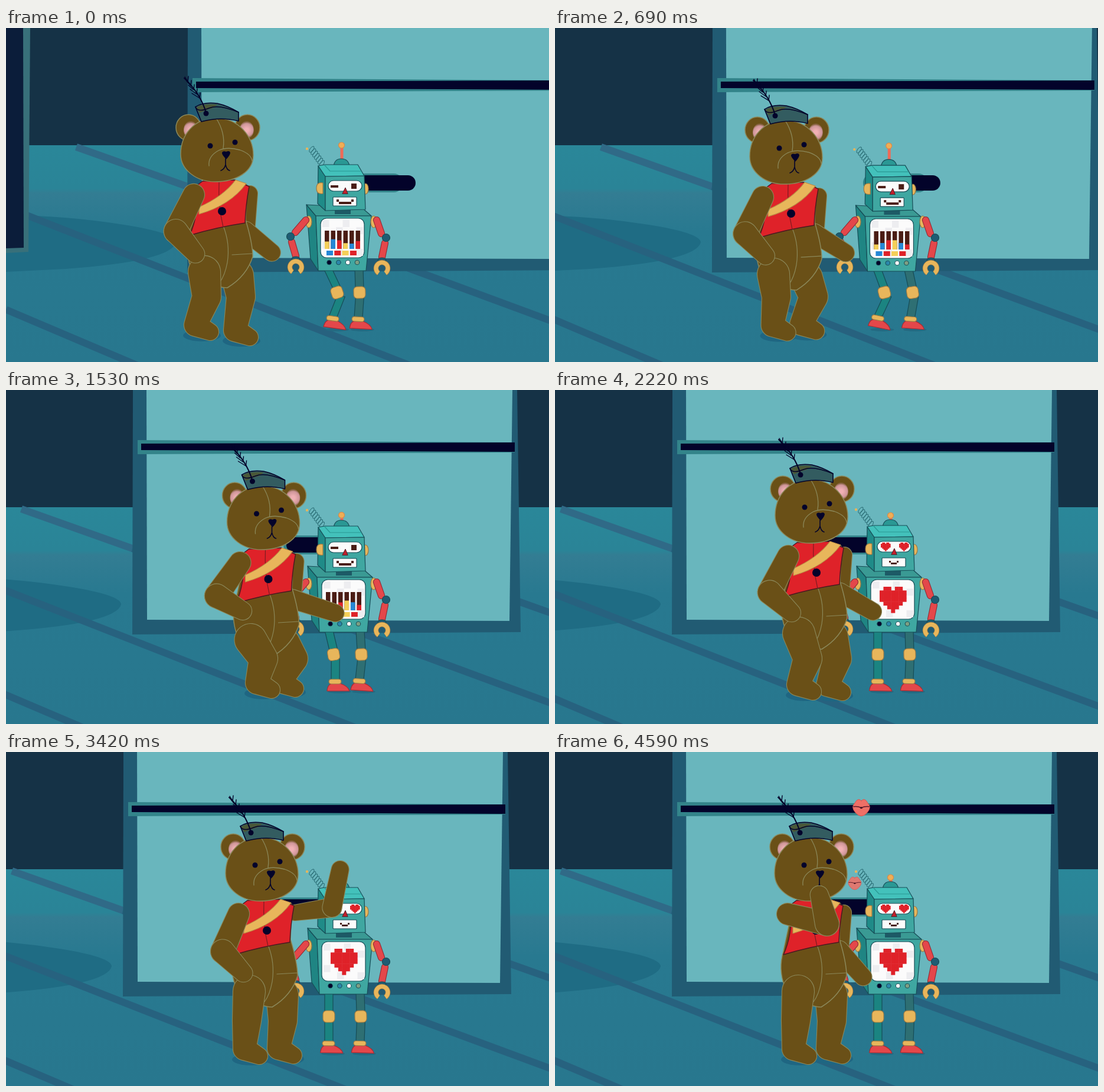
These frames come from a looping animation (920x567 px, 4620 ms). An HTML page with a canvas:

```html
<!DOCTYPE html>
<html lang="en">
<head>
<meta charset="utf-8">
<title>Bear and robot</title>
<style>
html, body { margin: 0; width: 100%; height: 100%; overflow: hidden; background: #153246; }
canvas { display: block; }
</style>
</head>
<body>
<canvas id="stage" width="920" height="567"></canvas>
<script>
const c = document.getElementById('stage').getContext('2d');
const LOOP = 4620, STEP = 30, HEARTS_AT = 1900;
const FUR = '#6a5017', SEAM = '#8b885a', INK = '#03032a', RED = '#df2229', CORAL = '#e4474a',
  TAN = '#e8b65b', LINE = '#174d57', STEEL = '#1e5c73', BRASS = '#9a7a45';
const rad = Math.PI / 180;

// --- timelines ---------------------------------------------------------
const pan = [[0, 0], [420, -24], [1020, -62], [1530, -93], [1780, -105], [2220, -109]];

// time, head x y, right arm (upper, lower, length), left arm (upper, lower),
// then per leg: knee x, ankle x y
const stand = [408, 405, 504, 469, 463, 503];
const bearKeys = [
  [0, 358, 206, 97, 39, 58, 116, 49, 340, 322, 504, 398, 389, 513],
  [420, 356, 206, 97, 41, 56, 111, 54, 325, 325, 511, 398, 380, 507],
  [1020, 436, 215, 97, 21, 71, 121, 39, 436, 424, 497, 487, 465, 497],
  [1530, 436.5, 216, 97, 18, 78, 125, 30, 436, 426, 497, 487, 466, 495],
  [2220, 435, 205, 97, 30, 65, 117, 43, 428, 413, 500, 478, 463, 501],
  [2700, 434, 198, 97, 30, 65, 113, 46, ...stand],
  [3180, 434, 198, -8, -78, 66, 113, 46, ...stand],
  [3480, 434, 198, -8, -78, 66, 113, 46, ...stand],
  [3930, 434, 198, 97, 48, 61, 14, -105, ...stand],
];

// time, head x y, torso x y, antenna, left knee and ankle x, right knee and ankle x
const robotKeys = [
  [0, 0, 2, -2, 1, 1, 561, 553, 599, 596],
  [420, -5, 4, -2, 2, 1, 553, 533, 609, 608],
  [1020, 0, 2, -1, 2, 1, 564, 563, 602, 594],
  [1530, 0, 1, 0, 0, .1, 555, 557, 602, 598],
  [2220, 0, 0, 0, 0, 0, 547, 546, 601, 599],
];

function sample(keys, t, smooth) {
  const i = keys.findIndex(k => k[0] > t);
  if (i < 0) return keys[keys.length - 1].slice(1);
  const a = keys[i - 1], b = keys[i];
  let u = (t - a[0]) / (b[0] - a[0]);
  if (smooth) u = u * u * (3 - 2 * u);
  return a.slice(1).map((v, j) => v + (b[j + 1] - v) * u);
}

// --- drawing helpers ---------------------------------------------------
function paint(p, fill, line, width = 1.2) {
  if (typeof p === 'string') p = new Path2D(p);
  if (fill) { c.fillStyle = fill; c.fill(p); }
  if (line) { c.strokeStyle = line; c.lineWidth = width; c.stroke(p); }
}
function oval(x, y, rx, ry, fill, line, width) {
  const p = new Path2D();
  p.ellipse(x, y, rx, ry, 0, 0, 7);
  paint(p, fill, line, width);
}
function box(x, y, w, h, r, fill, line) {
  const p = new Path2D();
  p.roundRect(x, y, w, h, r);
  paint(p, fill, line);
}
function rect(x, y, w, h, fill) {
  c.fillStyle = fill;
  c.fillRect(x, y, w, h);
}
function at(x, y, draw, turn = 0, scale = 1) {
  c.save();
  c.translate(x, y);
  c.rotate(turn);
  c.scale(scale, scale);
  draw();
  c.restore();
}
// outline around two circles joined by their tangents; joints are [x, y, radius]
function bone(path, [x1, y1, r1], [x2, y2, r2]) {
  const dir = Math.atan2(y2 - y1, x2 - x1);
  const open = Math.acos((r1 - r2) / Math.hypot(x2 - x1, y2 - y1));
  const p = new Path2D();
  p.arc(x1, y1, r1, dir + open, dir - open + 2 * Math.PI);
  p.arc(x2, y2, r2, dir - open, dir + open);
  p.closePath();
  path.addPath(p);
}
function limb(joints, fill = FUR, line = SEAM, width = 2.2) {
  const p = new Path2D();
  joints.slice(1).forEach((j, i) => bone(p, joints[i], j));
  paint(p, null, line, width);
  paint(p, fill);
}
function heart(x, y, w, h) {
  ['.##.##.', '#######', '#######', '#######', '.#####.', '..###..', '...#...'].forEach((row, j) =>
    [...row].forEach((cell, i) => cell === '#' && rect(x + i * w, y + j * h, w + .5, h + .5, RED)));
}

// --- room --------------------------------------------------------------
const floor = c.createLinearGradient(0, 199, 0, 567);
floor.addColorStop(0, '#2a8799');
floor.addColorStop(.2, '#2a8497');
floor.addColorStop(.22, '#337d93');
floor.addColorStop(.4, '#287990');
floor.addColorStop(1, '#28778e');

function room() {
  c.lineCap = 'butt';
  rect(-10, 0, 1200, 199, '#153246');
  rect(-10, 199, 1200, 368, floor);
  paint('M0 318Q100 318 200 334Q288 348 288 364Q280 396 100 409L0 414Z', '#1f6c84');
  paint('M119 202L307 269', null, '#306a87', 12);
  paint('M307 269L1120 570M0 304L690 575M0 478L235 578M950 355L1060 394', null, '#27627f', 12);
  paint('M0 0H41L38 380L0 382Z', '#38707a');
  paint('M0 0H29L30 373L0 374Z', '#0b1d3a');
  paint('M308 0H959L965 411L307 415Z', '#215b73');
  paint('M331 0H951L946 392L332 390Z', '#69b6bd');
  paint('M316 85L955 89V106L316 109Z', '#33848a');
  paint('M322 91L955 89V105L322 102Z', INK);
  box(563, 247, 110, 32, 16, '#33848a');
  box(568, 250, 126, 26, 13, INK);
}

// --- robot -------------------------------------------------------------
function robotLeg(hip, knee, ankle, shade) {
  const trail = Math.max(0, knee - ankle);
  const y = 495 - trail * .25;
  oval(ankle + 8, 512, 20, 3, '#236a82');
  const tube = (x1, y1, x2, y2) => paint(
    `M${x1 - 7} ${y1}H${x1 + 7}L${x2 + 7} ${y2}H${x2 - 7}Z`, shade, LINE);
  tube(hip, 408, knee, 442);
  tube(knee + (knee - hip) * .4, 456, ankle + 1, y - 3);
  at(knee, 449, () => box(-10, -10, 20, 20, 6, TAN, BRASS), (hip - knee) * .02);
  at(ankle, y, () => {
    paint('M-13 16Q-12 3 -2 3H9Q23 8 25 16Z', CORAL, '#a52c35');
    box(-10, -4, 21, 8, 4, TAN, BRASS);
  }, trail * rad);
}
function robotArm(shoulder, elbow, wrist) {
  const [sx, sy] = shoulder, [ex, ey] = elbow, [wx, wy] = wrist;
  const side = Math.sign(ex - sx);
  oval(sx - side * 5, sy + 3, 5, 10, TAN, BRASS);
  limb([[sx, sy, 5], [ex - side * 8, ey - 7, 5]], CORAL, '#8f2a35');
  limb([[ex - side * 2, ey + 9, 5], [wx, wy - 8, 5]], CORAL, '#8f2a35');
  oval(ex, ey, 6.5, 6.5, STEEL, LINE);
  oval(wx, wy - 3, 7, 4, STEEL, LINE);
  c.lineCap = 'butt';
  for (const [width, color] of [[8.5, BRASS], [7, TAN]]) {
    const claw = new Path2D();
    claw.arc(wx, wy + 11, 10, 125 * rad, 415 * rad);
    paint(claw, null, color, width);
  }
  c.lineCap = 'round';
}
function screen(t) {
  box(535, 322, 74, 67, 10, '#fbfbfb', LINE);
  for (let i = 0; i < 6; i++) for (let j = 0; j < 5; j++)
    if ((i * 7 + j * 5 + i * j) % 3 === 0) rect(538 + i * 11.5, 325 + j * 12.2, 11.5, 12, '#ededf0');
  if (t >= HEARTS_AT) return heart(550, 334, 6.45, 6.3);
  const hues = ['#f4cf58', '#2587d6', '#df2229'];
  for (let i = 0; i < 6; i++) {
    const x = 542 + i * 10.5;
    const level = 12.5 + 4 * Math.sin(i * 1.3 + t / 150);
    rect(x, 343, 7.5, 31, '#4a1c14');
    rect(x, 374 - level, 7.5, level, hues[i % 3]);
  }
  [1, 2, 0, 2].forEach((h, i) => rect(545 + i * 13.3, 377, 11, 8, hues[h]));
}
function robotHead(t, up) {
  // spring
  for (let i = 0; i < 7; i++) {
    const loop = new Path2D();
    loop.ellipse(518 + i * 2.9, 204 + i * 4, 6, 2.8, -.95, 0, 7);
    paint(loop, null, '#24676f', 1);
  }
  oval(510, 203, 2.2, 2.2, TAN);
  // antenna
  const ball = 213 - 16 * up;
  paint(`M569 224V${ball + 3}`, null, '#ee6b58', 5);
  oval(568.5, ball, 5, 5, '#f0ae55', '#d98a4a');
  paint('M555 234Q556 220 568 220Q581 220 582 234Q568 239 555 234Z', '#2a9894', LINE);
  // case
  oval(609, 271, 5, 9, TAN, BRASS);
  paint('M529 232L541 250V308L528 296Z', '#1f8b88', LINE);
  paint('M529 232L540 230H596L607 249L541 250Z', '#43c1bb', LINE);
  paint('M540 231L549 241H602', null, '#2a9894');
  paint('M541 250L607 249L609 306L541 308Z', '#3fa7a1', LINE);
  paint('M537 261Q526 259 526 270Q526 281 537 279Z', TAN, BRASS);
  box(546, 257, 57, 18, 9, '#fbfbfb', LINE);
  box(554, 285, 40, 15, 1, '#fbfbfb', LINE);
  paint('M570 279L575 269L579 279Z', '#c4202c', '#4a1c24', 1);
  const brown = '#4a1c14';
  if (t >= HEARTS_AT) {
    heart(552, 259, 2.3, 2);
    heart(583, 259, 2.3, 2);
    rect(566, 290, 3, 3, brown);
    rect(579, 290, 3, 3, brown);
    rect(569, 293, 10, 3, brown);
  } else {
    rect(550, 265, 13, 4, brown);
    rect(585, 262, 9, 9, brown);
    rect(560, 289, 4, 4, brown);
    rect(585, 289, 4, 4, brown);
    rect(564, 293, 21, 4, brown);
  }
}
function robot(t) {
  const [hx, hy, tx, ty, up, kneeL, ankleL, kneeR, ankleR] = sample(robotKeys, t);
  robotLeg(600 + tx, kneeR, ankleR, '#2e6f73');
  robotLeg(547 + tx, kneeL, ankleL, '#1b8481');
  at(tx, ty, () => {
    paint('M511 299L527 318L531 411L518 391Z', '#1f8583', LINE);
    paint('M511 299L605 304L621 318H527Z', '#3a9a94', LINE);
    rect(559, 304, 27, 11, '#1d5a66');
    paint('M527 318H621L612 411H531Z', '#3fa7a1', LINE);
    screen(t);
    [INK, '#2b87ab', '#ffffff', '#7f9f83'].forEach((hue, i) => oval(549.5 + i * 15.8, 397, 3.8, 3.8, hue, LINE, 1));
  });
  robotArm([508, 326], [482, 354], [491, 395]);
  robotArm([628, 326], [644, 356], [637, 397]);
  at(hx, hy, () => robotHead(t, up));
}

// --- bear --------------------------------------------------------------
function ear(x, y, side) {
  oval(x, y, 21, 22, FUR, SEAM, 1.5);
  const glow = c.createRadialGradient(x + side * 4, y + 4, 3, x + side * 4, y + 4, 14);
  glow.addColorStop(0, '#f0b0b4');
  glow.addColorStop(.7, '#cf969a');
  glow.addColorStop(1, '#7d5c35');
  oval(x + side * 4, y + 4, 12, 15, glow);
}
function bearHead() {
  ear(-49, -37, 1);
  ear(51, -37, -.3);
  paint('M-2 -53C-40 -53 -62 -24 -62 8C-62 36 -34 55 -4 55C32 55 61 38 61 10C61 -22 36 -53 -2 -53Z', FUR, SEAM, 1.5);
  paint('M-2 -53Q14 -28 10 -2M-14 28Q-16 12 2 2Q16 -5 38 1Q58 8 59 20', null, SEAM, 1.3);
  oval(-12, -6, 4.5, 4.5, INK);
  oval(30, -12, 4.5, 4.5, INK);
  paint('M15 17C11 12 8 9 8 6Q9 2 15 4Q21 1 22 6Q21 11 15 17Z', INK);
  paint('M14 16V26Q12 34 6 36M14 26Q16 35 21 36', null, INK, 1.6);
  // hat and feather
  paint('M-37 -72Q-24 -81 0 -78Q18 -74 36 -63V-48Q5 -56 -27 -47Z', '#335c60', INK, 1.6);
  paint('M-36 -70Q-28 -78 0 -76L-8 -70Q-22 -66 -30 -62Z', '#4a5838');
  paint('M-37 -72Q-33 -62 -14 -70Q2 -77 36 -63', null, INK, 1.5);
  oval(-19, -61, 4.5, 4.5, INK);
  paint('M-19 -62Q-28 -94 -56 -121', null, INK, 2);
  for (let i = 0; i < 5; i++) {
    const x = -30 - i * 5, y = -87 - i * 7;
    paint(`M${x} ${y}L${x - 13 + i * 2} ${y - 8}M${x} ${y}L${x + 1} ${y - 9}`, null, INK, 1.4);
  }
}
function torso() {
  paint('M-30 60H50L48 120Q60 160 60 182Q50 215 17 235Q-10 235 -45 200Q-56 170 -47 140Z', FUR, SEAM, 1.5);
  paint('M10 130Q22 160 17 192Q13 214 4 226M25 179L59 177', null, SEAM, 1.2);
  paint('M-25 54L30 52L54 63Q48 95 47 125Q0 132 -47 146Q-32 115 -33 60Z', RED, '#4a1820', 1.4);
  paint('M3 54Q1 95 10 132', null, '#7c1c22', 1.2);
  paint('M-31 98V110Q22 95 49 58L31 52Q10 80 -31 98Z', TAN, '#b98c45');
  oval(8, 105, 7, 7, INK);
}
function leg(hx, hy, knee, ax, ay) {
  limb([[hx, hy, 27], [knee, 456, 24], [ax - 1, ay, 19], [ax + 24, ay + 12, 14]]);
}
function arm(sx, sy, reach, upper, lower, len, radii) {
  const ex = sx + reach * Math.cos(upper * rad), ey = sy + reach * Math.sin(upper * rad);
  limb([[sx, sy, radii[0]], [ex, ey, radii[1]]]);
  limb([[ex, ey, radii[1]], [ex + len * Math.cos(lower * rad), ey + len * Math.sin(lower * rad), radii[2]]]);
}
function bear(t) {
  const [x, y, ru, rl, rlen, lu, ll, kneeL, axL, ayL, kneeR, axR, ayR] = sample(bearKeys, t, t > 1530);
  const wave = t > 3180 && t < 3480 ? 8 * Math.sin((t - 3420) / 240 * Math.PI) * Math.sin((t - 3180) / 300 * Math.PI) : 0;
  oval(axL + 10, ayL + 18, 32, 10, '#1f6682');
  oval(axR + 10, ayR + 18, 32, 10, '#1f6682');
  arm(x + 55, y + 75, 64, ru, rl + wave, rlen, [13, 16, 14.5]);
  leg(x + 34, y + 214, kneeR, axR, ayR);
  at(x, y, torso);
  leg(x - 22, y + 208, kneeL, axL, ayL);
  at(x, y, bearHead);
  arm(x - 40, y + 77, 69, lu, ll, 51, [18, 20, 15]);
}

// --- kisses ------------------------------------------------------------
function kiss(age) {
  if (age < 0) return;
  c.globalAlpha = Math.min(1, .75 + age / 900);
  at(505.5 + age * .0195, 250 - age * .225, () => {
    paint('M0 -12Q-6 -18 -11 -8Q-18 -1 -10 8Q0 20 10 8Q18 -1 11 -8Q6 -18 0 -12Z', '#ee7067', '#d9544f', 1);
    paint('M-13 -2Q-6 -3 0 0Q6 -3 13 -2', null, '#5c1a2a', 1.4);
    oval(0, 0, 2, 1.5, '#3a1020');
  }, 0, Math.min(1, .72 + age / 2400));
  c.globalAlpha = 1;
}

function frame(now) {
  const t = Math.floor(now % LOOP / STEP) * STEP;
  c.lineJoin = c.lineCap = 'round';
  c.clearRect(0, 0, 920, 567);
  at(sample(pan, t)[0], 0, room);
  robot(t);
  bear(t);
  kiss(t - 3900);
  kiss(t - 4470);
  requestAnimationFrame(frame);
}
requestAnimationFrame(frame);
</script>
</body>
</html>
```
